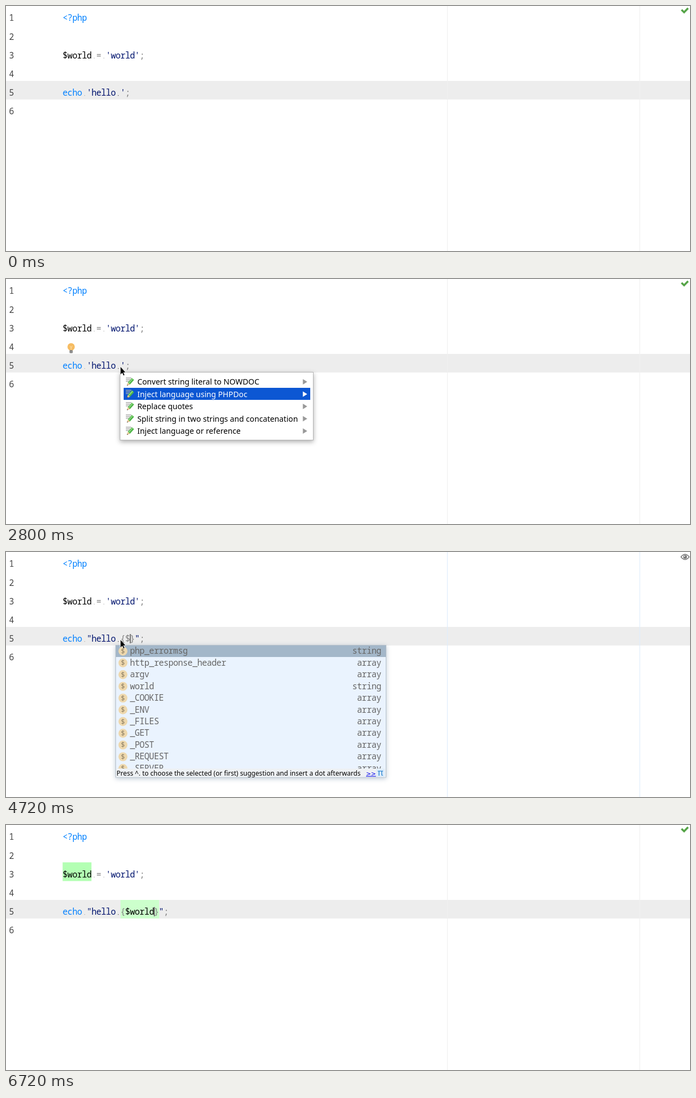
Recreate the animation shown at these times as an HTML page. Size 1250x448 px, loop 7.12 s.

```html
<!DOCTYPE html>
<html lang="en">
<head>
<meta charset="utf-8">
<title>Replace quotes</title>
<style>
  html, body { margin: 0; width: 100%; height: 100%; overflow: hidden; background: #fff; }
  svg { display: block; }
  text { white-space: pre; font: 14.2px "Noto Sans", sans-serif; }
  .code { font: 15.5px "Noto Sans Mono", monospace; letter-spacing: -.52px; }
  .hint { font-size: 12.1px; }
  .more { font: 10.8px "DejaVu Sans", sans-serif; text-decoration: underline; }
  .menu { filter: drop-shadow(0 3px 4px rgba(0,0,0,.32)); }
  .list { filter: drop-shadow(0 2px 4px rgba(90,120,150,.4)); }
</style>
</head>
<body>
<svg id="stage" width="1250" height="448" viewBox="0 0 1250 448"></svg>
<script>
const LOOP = 7120, STEP = 80;
const LEFT = 103.6, CHAR = 8.78, ROW = 34.15;
const BLUE = '#0080ff', NAVY = '#00146e', GRAY = '#808080', BLACK = '#000';
const stage = document.getElementById('stage');

const actions = ['Convert string literal to NOWDOC', 'Inject language using PHPDoc', 'Replace quotes',
  'Split string in two strings and concatenation', 'Inject language or reference'];
const variables = ['php_errormsg', 'http_response_header', 'argv', 'world', '_COOKIE', '_ENV',
  '_FILES', '_GET', '_POST', '_REQUEST', '_SERVER'];

// Each entry changes part of the editor state at its time.
const timeline = [
  [0, { quote: "'", body: '', brace: NAVY, caret: -1, ok: true }],
  [2000, { menu: 'blank' }],
  [2080, { menu: 0, bulb: true }],
  [2800, { menu: 1 }],
  [2960, { menu: 2 }],
  [3360, { menu: null, bulb: false, quote: '"', caret: 12, ok: false }],
  [3760, { ok: true }],
  [4000, { body: '{', caret: 13, ok: false }],
  [4080, { body: '{}' }],
  [4320, { ok: true }],
  [4720, { body: '{$}', brace: GRAY, caret: 14, ok: false, list: variables }],
  [4880, { body: '{$w}', caret: 15, list: ['world'] }],
  [4960, { body: '{$wo}', caret: 16 }],
  [5040, { body: '{$wor}', caret: 17 }],
  [5200, { body: '{$worl}', caret: 18 }],
  [5360, { body: '{$world}', caret: 19, list: null }],
  [5680, { ok: true, marks: true }]
];

const esc = s => s.replace(/&/g, '&amp;').replace(/</g, '&lt;');
const rect = (x, y, w, h, fill, more = '') =>
  `<rect x="${x}" y="${y}" width="${w}" height="${h}" fill="${fill}" ${more}/>`;
const path = (d, fill, more = '') => `<path d="${d}" fill="${fill}" ${more}/>`;
const text = (x, y, s, fill, more = '') => `<text x="${x}" y="${y}" fill="${fill}" ${more}>${esc(s)}</text>`;
const code = (x, y, s, fill, more = '') => text(x, y, s, fill, 'class="code" ' + more);
const at = (x, y, s) => `<g transform="translate(${x} ${y})">${s}</g>`;

// Draws coloured tokens and marks every space with a dot.
function line(row, tokens) {
  const y = 27.4 + ROW * row;
  let col = 0, out = '';
  for (const [s, color] of tokens) {
    out += code(LEFT + col * CHAR, y, s, color);
    [...s].forEach((c, i) => {
      if (c === ' ') out += rect(LEFT + (col + i + .5) * CHAR, y - 1, 1.2, 1.2, color === NAVY ? '#444' : '#aaa');
    });
    col += s.length;
  }
  return out;
}

function echoLine({ quote, body, brace }) {
  const name = body.replace(/[{}]/g, '');
  return line(4, [['echo', BLUE], [' ', GRAY], [quote + 'hello ', NAVY], [body.slice(0, 1), brace],
    [name, name.length > 1 ? BLACK : GRAY], [body.length > 1 ? '}' : '', brace], [quote, NAVY], [';', GRAY]]);
}

const check = path('M1234.5 7l4.7 4.5 7.3-7.5', 'none', 'stroke="#55a447" stroke-width="3.6"');
const eye = path('M1233.5 9q7.5-9.5 15 0q-7.5 9.5-15 0z', '#fff', 'stroke="#777" stroke-width="1.5"') +
  '<circle cx="1241" cy="9" r="3.4" fill="#777"/><circle cx="1240" cy="8" r="1.1" fill="#fff"/>';

const bulb = at(119, 125.5,
  '<circle cy="-1.5" r="6.7" fill="#f6bc62"/>' + path('M-5 2L-3 5H3L5 2z', '#f6bc62') +
  path('M-2-3l2 3 2-3M0 0V4', 'none', 'stroke="#fbe3b4"') +
  rect(-3, 4.5, 6, 5.5, '#777', 'rx="1.5"') + path('M-3 6.3h6M-3 8.3h6', 'none', 'stroke="#bbb" stroke-width=".7"'));

const pencil = path('M0 1h10M0 4h8M0 7h6', 'none', 'stroke="#aaa" stroke-width="1.7"') +
  path('M11 1l4 3.5-7.5 8.5-4-3.5z', '#4fb548') + path('M12.5 2.3l-7.5 8.5', 'none', 'stroke="#9be08d" stroke-width="1.3"') +
  path('M3.5 9.5l4 3.5-5.5 2z', '#e9c58f') + path('M2.6 13l1.5 1.2L2 15z', '#333');

const arrow = path('M0 0V15.2L3.4 12l2.2 4.8 2.4-1-2.2-4.7H10z', BLACK, 'stroke="#fff" stroke-width=".8"');

function menu(selected) {
  const blank = selected === 'blank';
  let out = rect(208.5, 170.5, 353, 124, blank ? '#ececec' : '#fff', 'stroke="#b4b4b4" class="menu"');
  if (blank) return out;
  actions.forEach((label, i) => {
    const y = 188 + 22.5 * i, on = i === selected;
    if (on) out += rect(215, Math.round(y - 11.6), 341, 22, '#0c57d3');
    out += at(219, y - 8, pencil) + text(240, y + 5, label, on ? '#fff' : '#000') +
      path(`M542.5 ${y - 5}l8 5-8 5z`, on ? '#fff' : '#999');
  });
  return out;
}

function list(items) {
  const full = items.length > 1, foot = full ? 396 : 192, bottom = foot + 16;
  let rows = rect(201, 171, 493, 21, '#a3b7c9');
  items.forEach((name, i) => {
    const y = 181.3 + 21.45 * i;
    rows += `<circle cx="213.7" cy="${y}" r="8.2" fill="#eed8ad"/>` +
      text(213.7, y + 4.5, '$', '#8b7d62', 'text-anchor="middle" style="font-size:12.5px"') +
      code(226.5, y + 5, name, '#666') +
      code(685.5, y + 5, name === 'world' || name === 'php_errormsg' ? 'string' : 'array', '#666', 'text-anchor="end"');
  });
  return rect(200.5, 170.5, 494, bottom - 170.5, '#eaf3fe', 'stroke="#b5bfc9" class="list"') +
    `<clipPath id="rows"><path d="M201 170H694V${foot}H201z"/></clipPath><g clip-path="url(#rows)">${rows}</g>` +
    rect(201, foot, 493, 15.5, '#eef1f4') +
    text(202, foot + 12.5, 'Press ^. to choose the selected (or first) suggestion and insert a dot afterwards', '#000', 'class="hint"') +
    text(658, foot + 12.5, '>>', '#0000ee', 'class="more"') +
    rect(677, foot + .5, 15, 14.5, '#dcecfb') +
    text(679, foot + 13, 'π', '#3087d0', 'style="font-size:16px"');
}

function pointer(t) {
  if (t < 160 || t >= 6400) return '';
  const away = Math.max(0, Math.floor((t - 6160) / STEP));
  if (away) return at(209 - 65 * away, 160 + 66 * away, arrow);
  const rest = (1 - Math.min(1, (t - 160) / 880)) ** 3;
  return at(209 + 429 * rest, 160 + 236 * rest, arrow);
}

function scene(t) {
  const s = Object.assign({}, ...timeline.filter(([start]) => start <= t).map(e => e[1]));
  const guide = s.list ? '#e0edfc' : '#f0f0f0';
  let out = rect(0, 137, 1250, 34, '#ededed');
  out += rect(806, 0, 1.2, 448, guide) + rect(1157.6, 0, 1.2, 448, guide);
  if (s.marks) out += rect(103.5, 68.3, 52.7, 34.2, '#b3ffb3') + rect(209.3, 137, 70.5, 34, '#ccffcc');
  for (let i = 0; i < 6; i++) out += code(5.6, 27.4 + ROW * i, String(i + 1), '#444');
  out += line(0, [['<?php', BLUE]]);
  out += line(2, [['$world', BLACK], [' = ', GRAY], ["'world'", NAVY], [';', GRAY]]);
  out += echoLine(s);
  if (s.caret > 0) out += rect(LEFT + s.caret * CHAR - .4, 150, 2.2, 17, '#777');
  out += s.ok ? check : eye;
  if (s.bulb) out += bulb;
  if (s.menu != null) out += menu(s.menu);
  if (s.list) out += list(s.list);
  return out + pointer(t);
}

let shown = -1;
function draw() {
  const t = Math.floor(performance.now() % LOOP / STEP) * STEP;
  if (t !== shown) stage.innerHTML = scene(shown = t);
  requestAnimationFrame(draw);
}
draw();
</script>
</body>
</html>
```
